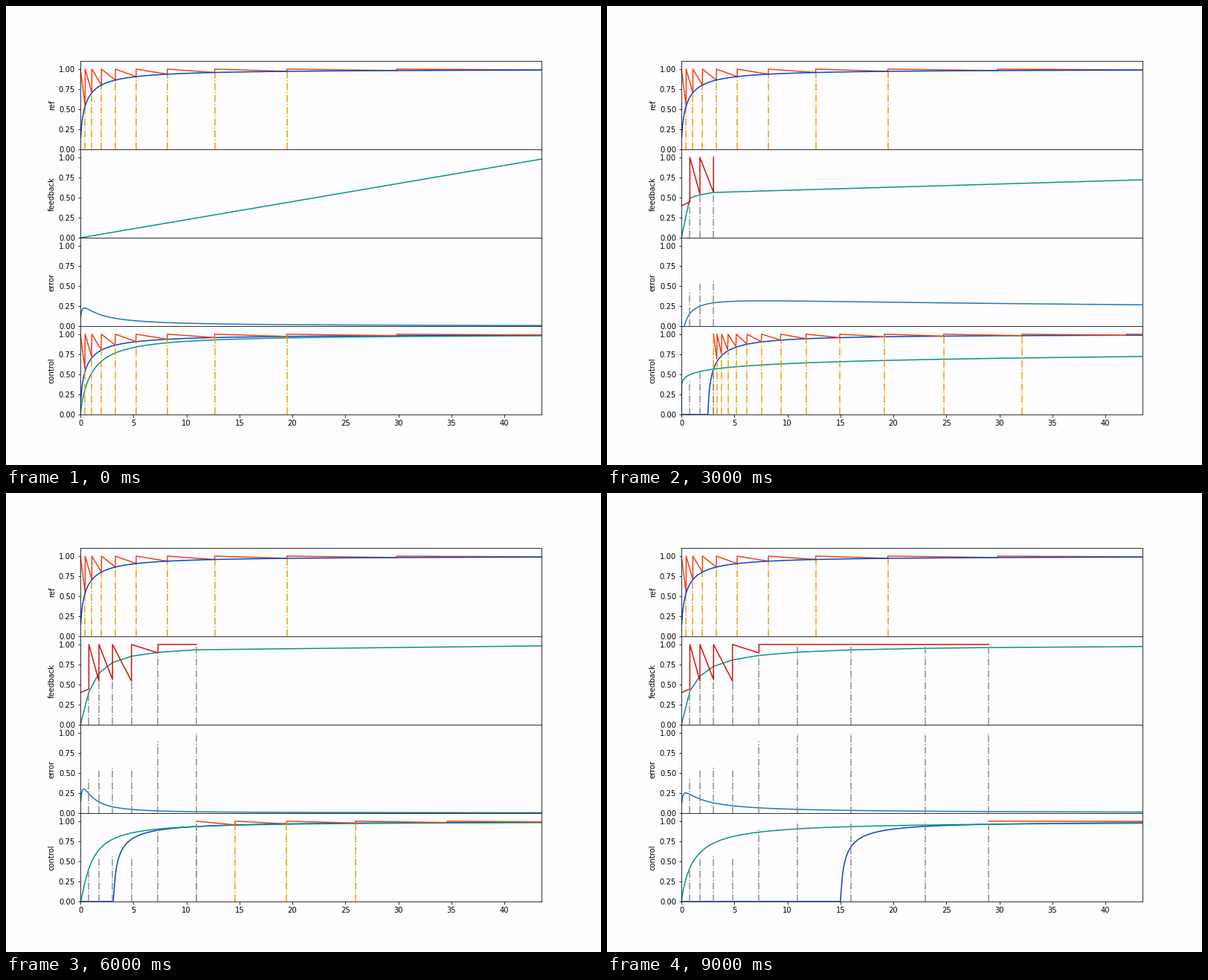
These frames come from a looping animation (800 by 618 pixels, 10000 ms). A matplotlib script:

```python
import numpy as np
import matplotlib.pyplot as plt
from matplotlib.animation import FuncAnimation

W, H, DPI = 800, 618, 72
XMAX = 43.5
PAPER = "#fefdff"
BLUE, TEAL, RED = "#0343cf", "#029386", "#d0120a"
ORANGE_RED, ORANGE, GREY = "#f2400f", "#eaa206", "#928f88"
NAMES = ["ref", "feedback", "error", "control"]

# Review times and the recall measured at each of them
REVIEWS = [0.8, 1.75, 3.03, 4.82, 7.32, 10.95, 16.0, 23.0, 29.0]
RECALL = [0.445, 0.545, 0.565, 0.545, 0.895, 1, 1, 1, 1]

# Log-odds of recall as a quadratic in log time: (a, b, c)
REF = (0.81, 0.83, 0.032)
EARLY = [
    (0.0, 0.98, 0.013),
    (-0.11, 0.49, 0.055),
    (0.027, 0.195, 0.0135),
    (0.043, 0.103, 0.003),
    (-0.3, 0.75, 0.04),
]
LEARNED, RELAXED = np.array([(-0.09, 1.24, -0.04), (-0.115, 0.98, 0.003)])

T = np.r_[0.03, np.arange(0.1, 44, 0.1)]
T0 = np.r_[0, T]


def model_at(n):
    if n < 6:
        return EARLY[max(n - 1, 0)]
    return LEARNED + (RELAXED - LEARNED) * ((n - 6) / 3) ** 2.4


def log_odds(t, model):
    a, b, c = model
    u = np.log(np.maximum(t, 0.005))
    return a + b * u + c * u * u


def recall(t, model):
    t = np.asarray(t, float)
    return np.where(t > 0, 1 / (1 + np.exp(-log_odds(t, model))), 0)


def delay_at(n):
    """Shift that makes the reference meet the model at the last review."""
    if n == 0:
        return 0
    a, b, c = REF
    t = REVIEWS[n - 1]
    gap = a - log_odds(t, model_at(n))
    return t - np.exp((-b + np.sqrt(b * b - 4 * c * gap)) / (2 * c))


def plan_at(n):
    """Planned reviews, up to the first one past the right edge."""
    plan = [REVIEWS[n - 1] if n else 0]
    delay = delay_at(n)
    while plan[-1] < XMAX:
        t = plan[-1]
        if n < 6:
            age = t - delay
            rate = 0.524 - 0.1113 * n ** 0.524
            gap = rate * age + 0.16 + 0.29 * np.exp(-n - age / 2.2)
        else:
            gap = t / 3 * 1.75 ** (n - 6)
        plan.append(t + gap)
    return plan


def stem(ax, t, h, color):
    ax.plot([t, t], [0, h], "-.", color=color)


def sawtooth(ax, n, trim=0.0):
    plan, delay = plan_at(n), delay_at(n)
    xs, ys = [plan[0]], [1]
    for a, b in zip(plan, plan[1:]):
        drop = 1 - recall(b - delay, REF)
        xs += [b - trim, b]
        ys += [1 - drop * (b - a - trim) / (b - a), 1]
    ax.plot(xs, ys, color=ORANGE_RED)
    for i, t in enumerate(plan[:-2]):
        if t > 0:
            stem(ax, t, recall(t - delay, REF) if i else 1, ORANGE)


def style(ax, name):
    ax.set_xlim(0, XMAX)
    ax.set_ylim(0, 1.1)
    ax.set_yticks(np.arange(0, 1.01, 0.25))
    ax.set_ylabel(name)
    ax.set_facecolor(PAPER)
    if name != "control":
        ax.tick_params(bottom=False, labelbottom=False)


def draw_feedback(ax, n, model):
    knots = np.r_[0, REVIEWS[:n], XMAX]
    ax.plot(knots, recall(knots, model), color=TEAL)
    if n:
        xs, ys = [0], [0.4]
        for t, r in zip(REVIEWS[:n], RECALL):
            xs += [t, t]
            ys += [r, 1]
        ax.plot(xs, ys, color=RED)


def draw_control(ax, n, model):
    ax.plot(T0, recall(T0 - delay_at(n), REF), color=BLUE)
    ax.plot(T0, recall(T0, model), color=TEAL)
    sawtooth(ax, n, trim=0.03)


plt.rcParams["font.family"] = "DejaVu Sans"
fig, axes = plt.subplots(4, 1, figsize=(W / DPI, H / DPI), dpi=DPI,
                         facecolor=PAPER)
fig.subplots_adjust(left=0.125, right=0.9, bottom=0.11, top=0.88, hspace=0)

sawtooth(axes[0], 0)
axes[0].plot(T, recall(T, REF), color=BLUE)
style(axes[0], NAMES[0])


def update(n):
    model = model_at(n)
    for ax in axes[1:]:
        ax.clear()
    draw_feedback(axes[1], n, model)
    axes[2].plot(T, recall(T, REF) - recall(T, model), color="#1f77b4")
    draw_control(axes[3], n, model)
    for ax, name in zip(axes[1:], NAMES[1:]):
        for t, r in zip(REVIEWS[:n], RECALL):
            stem(ax, t, r, GREY)
        style(ax, name)
    return []


anim = FuncAnimation(fig, update, frames=10, interval=1000,
                     init_func=lambda: update(0), repeat=True, repeat_delay=0)
plt.show()
```
